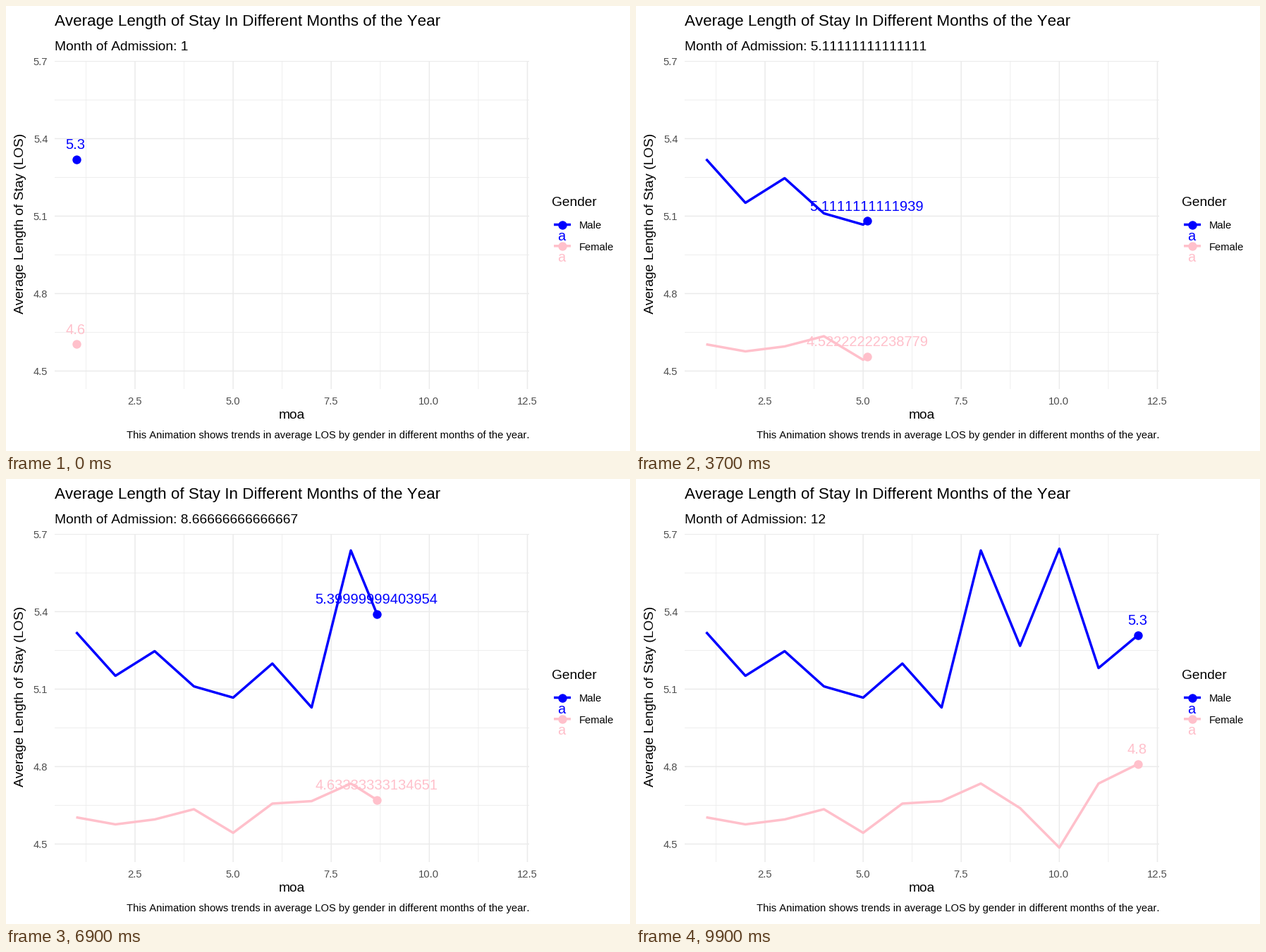
Animation of 885 by 632 pixels, one loop 10000 ms. Source, as a matplotlib script:

```python
import numpy as np
import matplotlib.pyplot as plt
from matplotlib.animation import FuncAnimation

W, H, DPI = 885, 632, 72          # at 72 dpi one point is one pixel
FRAMES, STEPS = 100, 9            # nine steps from month to month
LEFT, RIGHT, TOP, BOTTOM = 68.9, 742.3, 77.8, 544
PX_X, PX_Y = 55.65, 366.67        # pixels per data unit

SERIES = {
    "Male": ("#0000FF", [5.3206, 5.1515, 5.247, 5.1106, 5.067, 5.199,
                         5.0288, 5.637, 5.2675, 5.6438, 5.1816, 5.3084]),
    "Female": ("#FFC0CB", [4.6034, 4.5761, 4.5952, 4.6348, 4.5434, 4.6566,
                           4.6661, 4.7343, 4.639, 4.4862, 4.7343, 4.8093]),
}
MONTHS = np.arange(1, 13)
GRID, TICK = "#EBEBEB", "#4D4D4D"
SMALL, BASE, LABEL, TITLE = 14.81, 19.1, 20.1, 22.43

plt.rcParams["font.family"] = "Liberation Sans"
plt.rcParams["text.kerning_factor"] = 6

fig = plt.figure(figsize=(W / DPI, H / DPI), dpi=DPI, facecolor="white")

stage = fig.add_axes([0, 0, 1, 1])
stage.set(xlim=(0, W), ylim=(H, 0))
stage.axis("off")

panel = fig.add_axes([LEFT / W, 1 - BOTTOM / H,
                      (RIGHT - LEFT) / W, (BOTTOM - TOP) / H])
panel.set(xlim=(2.5 + (LEFT - 183) / PX_X, 2.5 + (RIGHT - 183) / PX_X),
          ylim=(5.4 - (BOTTOM - 188.4) / PX_Y, 5.4 - (TOP - 188.4) / PX_Y))
panel.axis("off")


def write(x, y, text, size, color="black", **kw):
    return stage.text(x, y, text, size=size, color=color, va="baseline", **kw)


def stroke(ax, color, x=(), y=()):
    return ax.plot(x, y, color=color, lw=3.5, solid_capstyle="butt",
                   solid_joinstyle="round", snap=False)[0]


def dot(ax, color, x=(), y=()):
    return ax.plot(x, y, "o", color=color, ms=12.4, mew=0, snap=False)[0]


def draw_grid():
    minor = dict(color=GRID, lw=0.8, zorder=0, snap=False)
    major = dict(color=GRID, lw=1.5, zorder=1, snap=False)
    for v in np.arange(1.25, 12, 2.5):
        panel.axvline(v, **minor)
    for v in (4.65, 4.95, 5.25, 5.55):
        panel.axhline(v, **minor)
    for v in np.arange(2.5, 13, 2.5):
        panel.axvline(v, **major)
        write(182.5 + (v - 2.5) * PX_X, 566, f"{v:.1f}", SMALL, TICK,
              ha="center")
    for i, v in enumerate((5.7, 5.4, 5.1, 4.8, 4.5)):
        panel.axhline(v, **major)
        write(59.4, 84 + 110 * i, f"{v:.1f}", SMALL, TICK, ha="right")


def draw_legend():
    write(774, 284, "Gender", BASE)
    for i, (name, (color, _)) in enumerate(SERIES.items()):
        y = 310.5 + 30.3 * i
        stroke(stage, color, (777, 801), (y, y))
        dot(stage, color, [789], [y])
        write(788, 333 + 30 * i, "a", LABEL, color, ha="center")
        write(813, round(y + 5.8), name, SMALL)


draw_grid()
draw_legend()
write(69, 28, "Average Length of Stay In Different Months of the Year", TITLE)
subtitle = write(69, 63, "", BASE)
write(405, 586, "moa", BASE, ha="center")
write(25, 309, "Average Length of Stay (LOS)", BASE, ha="center",
      rotation=90, rotation_mode="anchor")
write(171, 614, "This Animation shows trends in average LOS by gender "
      "in different months of the year.", SMALL)

marks = [(stroke(panel, color), dot(panel, color),
          panel.text(1, 5, "", size=LABEL, color=color, ha="center",
                     va="baseline", clip_on=True, zorder=4),
          np.array(values))
         for color, values in SERIES.values()]


def update(frame):
    i = min(frame // STEPS, len(MONTHS) - 2)
    t = (frame - i * STEPS) / STEPS
    month = 1 + frame / STEPS
    t32 = float(np.float32(t))     # labels are blended in single precision
    subtitle.set_text(f"Month of Admission: {month:.15g}")
    for line, point, label, values in marks:
        y = values[i] + (values[i + 1] - values[i]) * t
        line.set_data(np.append(MONTHS[:i + 1], month),
                      np.append(values[:i + 1], y))
        point.set_data([month], [y])
        a, b = (round(float(v), 1) for v in values[i:i + 2])
        label.set_text(f"{a + (b - a) * t32:.15g}")
        label.set_position((month - 0.8 / PX_X, y + 14.5 / PX_Y))
    return []


anim = FuncAnimation(fig, update, frames=FRAMES, interval=100,
                     init_func=lambda: update(0), repeat=True,
                     repeat_delay=0, blit=False)
plt.show()
```
